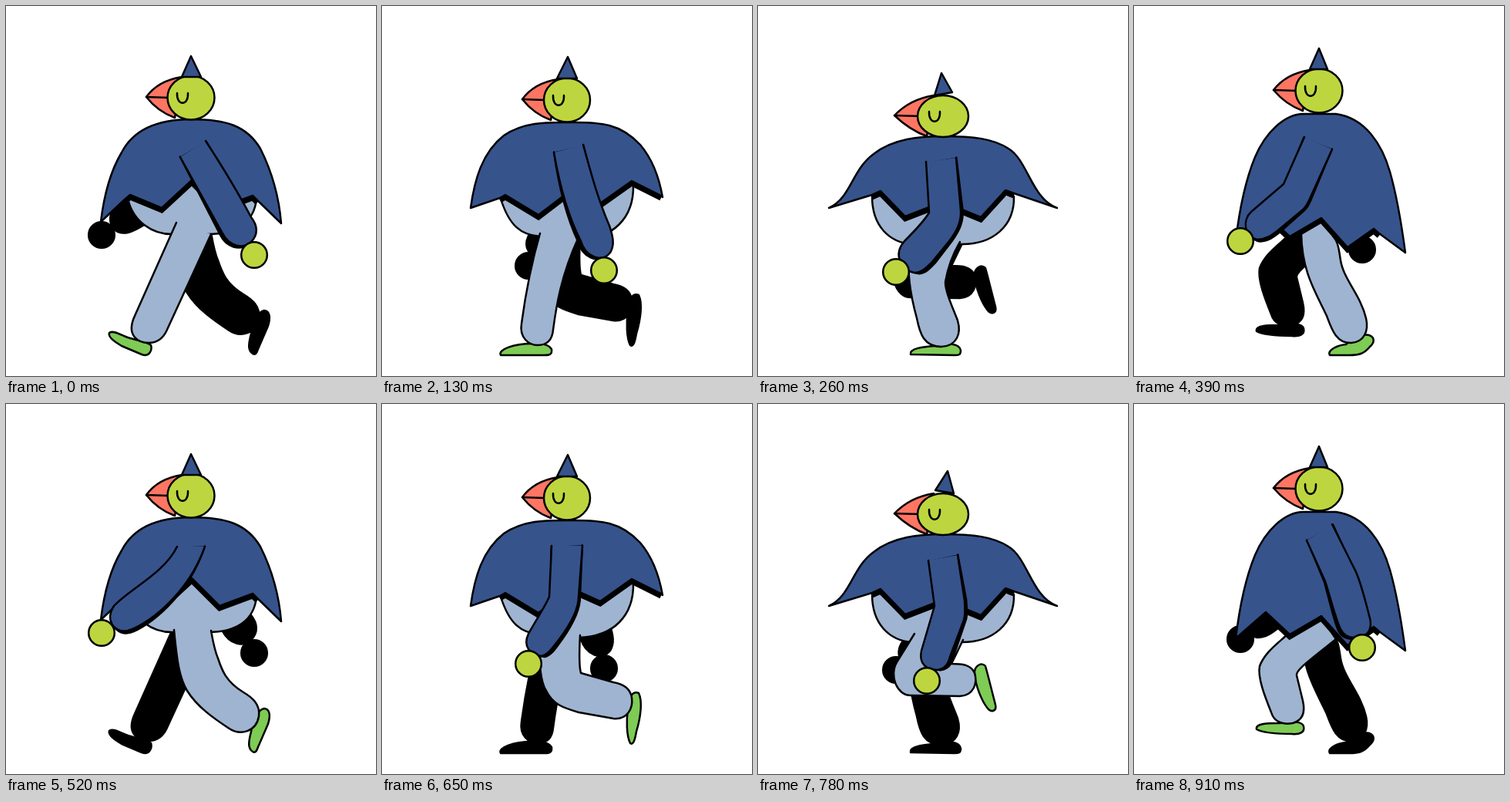
These frames come from a looping animation (480x480 px, 1040 ms). An HTML page with a canvas:

```html
<!DOCTYPE html>
<html>
<head>
<meta charset="utf-8">
<style>
html, body { margin: 0; height: 100%; overflow: hidden; background: #fff; }
canvas { display: block; }
</style>
</head>
<body>
<canvas id="stage" width="480" height="480"></canvas>
<script>
const ctx = document.getElementById('stage').getContext('2d');
const STEP = 130;
const BLACK = '#000', BLUE = '#36538c', PALE = '#9fb4d0', LIME = '#bdd63f', GREEN = '#7ecb55', RED = '#ff7563';

// Limb poses over the full walk cycle; the far side runs half a cycle behind.
const legs = [
  'M221 281L167 402C155 428 172 437 185 437C198 437 204 430 208 422L266 296',
  'M205 295C192 340 186 375 181 412C178 430 190 440 202 440C215 440 221 432 222 420C226 390 232 350 255 300',
  'M196 306C193 345 197 372 206 405C210 425 215 442 238 442C258 441 264 425 259 408C250 385 243 370 243 358C247 335 255 318 262 306',
  'M222 285L217 296C218 345 235 370 250 402C256 418 262 438 282 437C298 436 305 422 301 405C294 375 272 355 268 330C266 318 266 312 262 304L242 275',
  'M218 293C222 335 225 355 235 372C248 393 270 408 288 420C305 432 325 424 328 405C330 390 320 381 308 374C285 360 280 345 275 330C270 318 268 305 266 294',
  'M205 296C203 335 205 360 213 372C222 390 235 394 255 400L300 408C318 410 326 395 324 381C322 368 312 363 300 361L258 349C255 338 256 318 257 300',
  'M203 298L180 335C170 352 180 378 198 378L262 379C280 378 285 362 281 349C276 338 265 337 251 337L266 306',
  'M200 298C185 312 170 322 163 340C160 355 170 380 178 400C182 414 195 416 206 414C220 410 222 398 219 385L211 352C210 345 225 335 262 305L242 275'
];
const feet = [
  'M134 424C132 430 142 436 150 441L176 452C186 456 190 446 188 440C183 435 170 434 158 430C148 426 138 420 134 424Z',
  'M154 453C150 446 170 438 195 438C210 436 222 442 220 449C219 453 215 453 210 453Z',
  'M198 452C196 444 215 442 230 441C245 436 262 438 263 447C263 453 260 453 255 453Z',
  'M254 453C250 446 265 440 275 439C285 430 298 425 305 427C313 430 312 437 306 442C298 452 290 453 280 453Z',
  'M320 451C314 447 314 440 318 425C320 410 326 397 335 395C343 396 343 405 340 415L327 445C325 451 323 453 320 451Z',
  'M322 440C317 430 317 410 319 395C320 378 326 372 333 375C338 385 336 405 330 425C328 436 326 443 322 440Z',
  'M281 350C280 340 290 334 295 340C298 350 304 375 308 390C310 398 303 401 298 395C290 385 282 365 281 350Z',
  'M159 422C157 414 175 414 190 414C205 412 218 411 220 418C222 426 215 429 205 428C190 428 168 427 159 422Z'
];
const arms = [
  'M226 196L281 295C290 312 308 316 318 306C328 296 326 284 318 274C300 240 285 215 259 175',
  'M223 190C230 230 240 270 258 305C264 325 285 334 296 320C302 310 300 300 295 285C280 250 272 220 261 180',
  'M218 202L222 268C215 280 200 295 190 305C175 322 185 343 203 346C212 346 218 340 225 333L248 305C258 292 264 280 263 265L257 197',
  'M221 170L194 231L152 267C140 278 143 300 160 303C172 303 180 296 188 290L218 265C224 260 226 254 228 250L257 186',
  'M222 185C205 220 160 240 140 262C128 280 140 298 158 294C180 288 235 250 258 185',
  'M220 184L217 250C212 262 200 280 190 298C182 315 193 326 207 327C216 325 222 315 230 305C245 285 255 265 255 250L260 184',
  'M221 203L229 262L212 320C208 338 220 345 232 345C243 344 247 337 249 328L266 283C270 275 268 262 268 255L259 196',
  'M224 177L248 230C256 255 262 280 268 292C274 304 285 304 293 302C305 300 309 290 306 278C300 255 293 225 285 212L257 156'
];
const hands = [[322, 323], [288, 343], [179, 345], [138, 305], [124, 297], [190, 337], [219, 359], [296, 316]];

// Body poses repeat every half cycle.
const bodies = [
  { cape: 'M123 280C126 255 132 220 150 190C168 155 205 147 240 147C285 147 312 155 330 185C345 215 354 245 357 282',
    hem: 'L326 252L320 246L277 262L241 226L202 262L161 245L155 250',
    hips: 'M162 238L158 250C165 280 190 296 215 296L262 296C300 296 322 280 325 250L320 240L240 200',
    y: 119, rx: 30.5, ry: 28.5, tip: 182, hat: 'M240 65L228 92L253 92Z' },
  { cape: 'M115 262C120 225 130 190 158 168C185 150 215 151 240 151C285 150 310 153 335 180C352 200 360 225 364 248',
    hem: 'L362 246L324 227L283 256L245 239L203 271L160 245L153 249',
    hips: 'M154 250C165 285 180 297 205 299L255 303C300 302 327 275 326 232L240 220',
    y: 122, rx: 30, ry: 28.5, tip: 182, hat: 'M241 66L227 94L253 94Z' },
  { cape: 'M92 262C120 250 122 212 150 192C175 172 210 169 240 169C280 169 305 172 325 185C350 200 355 250 388 262',
    hem: 'L332 243L321 239L289 274L240 254L191 273L159 240L148 245',
    hips: 'M148 247C148 285 170 307 200 309L262 309C305 310 333 285 332 247',
    y: 143, rx: 33, ry: 27, tip: 177, hat: 'M238 87L229 116L252 112Z', hatBack: 'M246 87L230 112L254 116Z' },
  { cape: 'M132 304C137 262 145 225 157 196C170 165 195 140 220 140L262 140C300 145 322 180 332 215C342 250 348 290 352 320',
    hem: 'L318 295L311 289L277 313L243 275L202 299L171 270L163 277',
    hips: '',
    y: 110, rx: 30.5, ry: 28.5, tip: 181, hat: 'M240 55L228 82L251 82Z' }
];

function shape(d, fill) {
  const path = d instanceof Path2D ? d : new Path2D(d);
  if (fill) {
    ctx.fillStyle = fill;
    ctx.fill(path);
  }
  ctx.stroke(path);
}

function oval(x, y, rx, ry, fill) {
  const path = new Path2D();
  path.ellipse(x, y, rx, ry, 0, 0, 7);
  shape(path, fill);
}

function leg(i, skin, shoe) {
  shape(feet[i], shoe);
  shape(legs[i], skin);
}

function arm(i, sleeve, skin) {
  shape(arms[i], sleeve);
  oval(...hands[i], 16.8, 16.8, skin);
}

function armShadow(i) {
  ctx.save();
  ctx.translate(240, 190);
  ctx.rotate(i < 2 || i === 7 ? 0.033 : -0.033);
  ctx.translate(-240, -190);
  shape(arms[i], BLACK);
  ctx.restore();
}

function hemShadow(hem) {
  ctx.save();
  ctx.translate(0, 3);
  ctx.lineWidth = 7;
  ctx.lineJoin = 'miter';
  shape('M' + hem.slice(1));
  ctx.restore();
}

function head({ y, rx, ry, tip }, hat) {
  const mid = y - 1;
  shape(`M${tip} ${mid}Q197 ${y - 22} 228 ${y - 27}L219 ${y + 26}Q197 ${y + 18} ${tip} ${mid}Z`, RED);
  shape(`M${tip} ${mid}L212 ${y}`);
  oval(240, y, rx, ry, LIME);
  shape(`M222 ${y - 6}C221 ${y + 11} 237 ${y + 11} 236 ${y - 6}`);
  shape(hat, BLUE);
}

function draw(now) {
  const near = Math.floor(now / STEP) % 8;
  const far = (near + 4) % 8;
  const body = bodies[near % 4];
  ctx.fillStyle = '#fff';
  ctx.fillRect(0, 0, 480, 480);
  ctx.strokeStyle = BLACK;
  ctx.lineWidth = 2.5;
  ctx.lineCap = ctx.lineJoin = 'round';

  arm(far, BLACK, BLACK);
  leg(far, BLACK, BLACK);
  shape(body.hips, PALE);
  leg(near, PALE, GREEN);
  ctx.lineCap = 'butt';
  hemShadow(body.hem);
  ctx.lineCap = 'round';
  shape(body.cape + body.hem + 'Z', BLUE);
  armShadow(near);
  arm(near, BLUE, LIME);
  head(body, near > 3 && body.hatBack || body.hat);
}

const start = performance.now();
function tick() {
  draw(performance.now() - start);
  requestAnimationFrame(tick);
}
tick();
</script>
</body>
</html>
```
